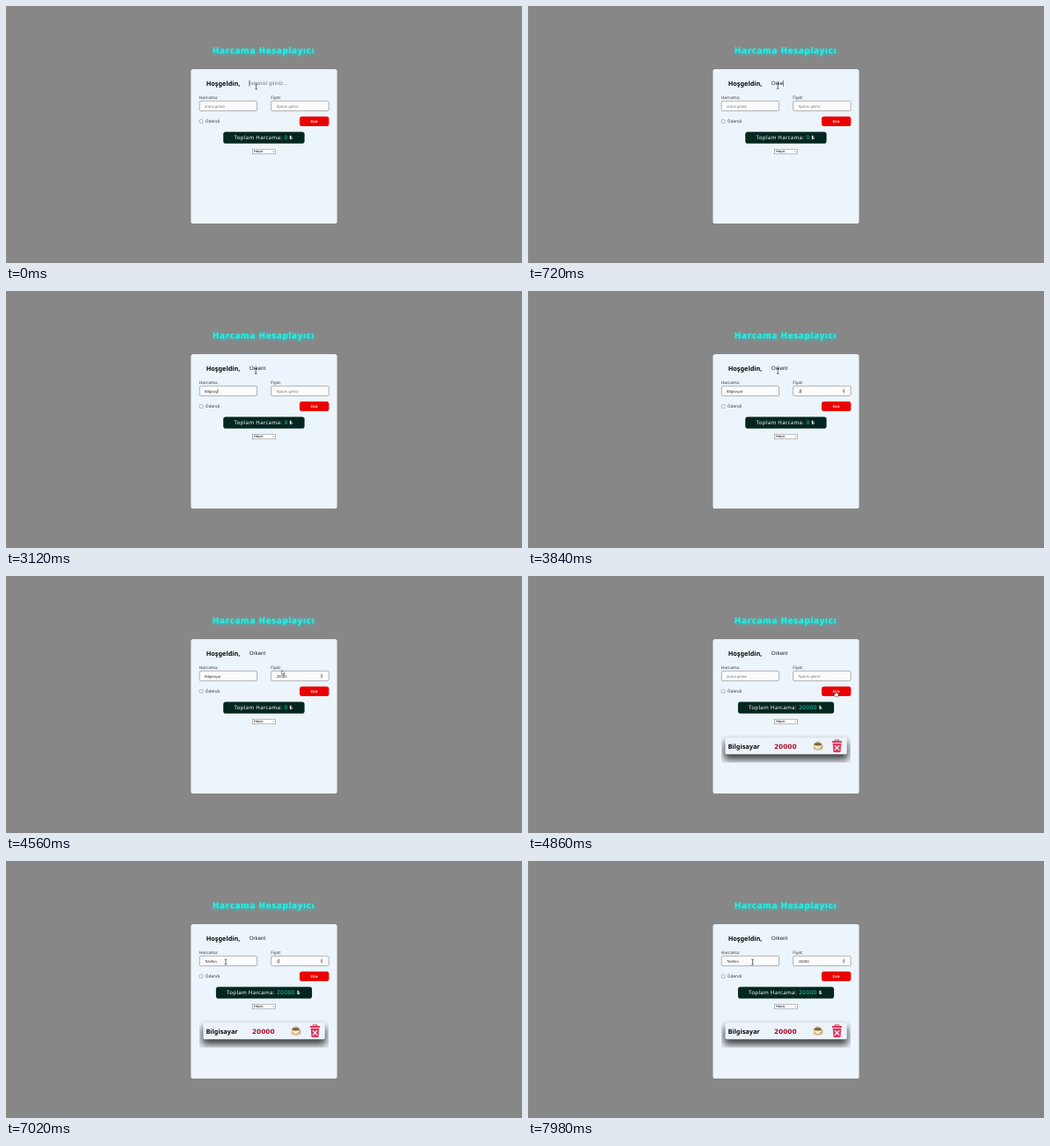
An HTML page for the animation above (8 s loop, 587x293 px).

```html
<!DOCTYPE html>
<html lang="tr">
<head>
<meta charset="utf-8">
<title>Harcama Hesaplayıcı</title>
<style>
  html, body { margin: 0; width: 100%; height: 100%; overflow: hidden; background: #878787; }
  svg { display: block; width: 587px; height: 293px; }
  text { font-family: "Noto Sans", "Open Sans", sans-serif; text-rendering: geometricPrecision; white-space: pre; }
  .title { font-size: 9.8px; font-weight: 800; letter-spacing: .74px; fill: #22f5e8; }
  .big { font-size: 7.34px; font-weight: 700; fill: #0b0b0b; }
  .label { font-size: 4.75px; fill: #333; }
  .name, .field, .small { font-family: "Liberation Sans", Arial, sans-serif; }
  .name { font-size: 6.2px; fill: #222; }
  .field { font-size: 4.28px; fill: #333; }
  .small { font-size: 4.08px; fill: #111; }
  .hint { fill: #777; }
  .total { font-size: 6.1px; letter-spacing: .3px; fill: #fff; }
  .digits { font-family: "DejaVu Sans", sans-serif; }
  .box { fill: #fbfcfd; stroke: #7d8184; stroke-width: .6; }
  .button { font: 700 4.2px "Liberation Serif", Times, serif; fill: #fff; text-anchor: middle; }
</style>
</head>
<body>
<svg viewBox="0 0 587 293">
  <defs>
    <filter id="glow" x="-20%" y="-100%" width="140%" height="300%"><feGaussianBlur stdDeviation="1.8"/></filter>
    <filter id="soft" x="-20%" y="-100%" width="140%" height="300%"><feGaussianBlur stdDeviation="4"/></filter>
    <clipPath id="list"><rect x="220" y="181" width="147" height="31.7"/></clipPath>
  </defs>

  <rect width="587" height="293" fill="#878787"/>
  <rect width=".7" height="293" fill="#9a8a80"/>

  <text class="title" x="235.4" y="55" style="fill:#00e5e5" filter="url(#glow)">Harcama Hesaplayıcı</text>
  <text class="title" x="234.8" y="54.4">Harcama Hesaplayıcı</text>

  <rect x="210.4" y="72" width="166.2" height="176" rx="2.6" fill="#edf5fc"/>
  <text class="big" x="227.7" y="91">Hoşgeldin,</text>
  <text class="label" x="219.8" y="105.8">Harcama:</text>
  <text class="label" x="301.2" y="105.8">Fiyat:</text>
  <rect class="box" x="220.2" y="108.3" width="65.4" height="11.3" rx="1.6"/>
  <rect class="box" x="301.6" y="108.3" width="65.6" height="11.3" rx="1.6"/>
  <rect x="220.2" y="129.7" width="3.7" height="3.7" rx=".7" fill="#fff" stroke="#707070" stroke-width=".5"/>
  <text class="label" x="226.8" y="133.2">Ödendi</text>
  <rect x="334" y="126" width="33.4" height="11" rx="2.8" fill="#ea0000"/>
  <text class="button" x="350.6" y="132.9">Ekle</text>

  <rect id="bar" y="143.4" height="13.3" rx="2.8" fill="#03271f"/>
  <text id="totalLabel" class="total" y="152.3">Toplam Harcama:</text>
  <text id="sum" class="total digits" y="152.3" style="fill:#2ccfae"></text>
  <text id="lira" class="total" y="152.3" font-weight="600">₺</text>

  <rect x="280.6" y="163.2" width="26" height="5.6" fill="#fff" stroke="#777" stroke-width=".5"/>
  <text class="small" x="282" y="167.4">Hepsi</text>
  <path d="M303.3 165.5l1 1 1-1" fill="none" stroke="#333" stroke-width=".5"/>

  <g id="item">
    <g clip-path="url(#list)">
      <rect x="223" y="189" width="141" height="20.5" fill="#000" opacity=".75" filter="url(#soft)"/>
    </g>
    <rect x="224.4" y="184.3" width="138.4" height="19" rx="2" fill="#edf3fa"/>
    <text class="big" x="227.4" y="197">Bilgisayar</text>
    <text class="big digits" x="280" y="197" style="fill:#ab0d2c">20000</text>
    <g>
      <ellipse cx="330" cy="196.6" rx="5.8" ry="2.1" fill="#d9c29a"/>
      <path d="M325.4 191.5h8.6q-.3 6.3-4.3 6.3t-4.3-6.3z" fill="#f3e6c8" stroke="#b58a4a" stroke-width=".6"/>
      <ellipse cx="329.7" cy="191.7" rx="4.2" ry="1.7" fill="#8b6234"/>
      <path d="M326.5 190.5l3-1.6 3.2 1.4" fill="none" stroke="#9aa58a" stroke-width="1"/>
      <path d="M333.5 193q2.6-.3 1.6 1.7-.7 1.1-2.3 1" fill="none" stroke="#b58a4a" stroke-width=".8"/>
    </g>
    <g fill="#e2395b">
      <path d="M349.3 188.3v-1.4h4.4v1.4" fill="none" stroke="#c22c4c" stroke-width=".9"/>
      <rect x="345.8" y="188" width="11.4" height="2.3" rx=".8"/>
      <path d="M346.7 191h9.6l-.7 9q-.1 1-1.1 1h-6q-1 0-1.1-1z"/>
      <path d="M349.3 193.7l4.4 4.5m0-4.5l-4.4 4.5" stroke="#fff" stroke-width="1.2" stroke-linecap="round"/>
    </g>
  </g>

  <text id="name" class="name" x="276.7" y="90.3"></text>
  <text id="goods" class="field" x="226" y="115.6"></text>
  <text id="price" class="field" x="307.7" y="115.6"></text>
  <g id="spinner">
    <rect x="357.4" y="111.3" width="3.4" height="5.3" fill="#e9e6e8"/>
    <path d="M358 113.4l1.1-1.4 1.1 1.4zM358 114.6l1.1 1.4 1.1-1.4z" fill="#775f66"/>
  </g>
  <rect id="caret" width=".5" fill="#111"/>

  <g id="beam" fill="none" stroke="#222" stroke-width=".65">
    <path d="M-1.3-3q1.3 0 1.3.7 0-.7 1.3-.7M0-2.6v5.2M-1.3 3q1.3 0 1.3-.7 0 .7 1.3.7"/>
  </g>
  <path id="arrow" d="M0 0v5l1.2-1.1.9 2 .9-.4-.9-1.9h1.6z" fill="#fff" stroke="#222" stroke-width=".5"/>
  <path id="hand" d="M-.6 3V-.6q.6-.7 1.2 0v1.7l2 .5q.7.3.5 1.2l-.5 2.6h-3l-1.8-2.5q-.1-.8.6-.5z" fill="#fff" stroke="#222" stroke-width=".45"/>
</svg>
<script>
const LOOP = 8000, TICK = 60, ADD = 4860;
const $ = id => document.getElementById(id);

const fields = {
  name:  { hint: "İsminizi giriniz...", size: 6.2 },
  goods: { hint: "ürünü giriniz", size: 4.28 },
  price: { hint: "fiyatını giriniz", size: 4.28 }
};

// Each entry: field, time of focus, typed text, time of each key.
const typing = [
  ["name", 0, "Orkent", [360, 480, 600, 660, 780, 840]],
  ["goods", 1380, "Bilgisayar", [1860, 1980, 2100, 2340, 2460, 2580, 2880, 3120, 3240, 3300]],
  ["price", 3420, "20000", [3780, 3900, 3960, 4080, 4140]],
  ["goods", 5640, "Telefon", [5820, 5940, 6060, 6360, 6420, 6480, 6720]],
  ["price", 6780, "15000", [7020, 7080, 7380, 7440, 7560]]
];

// Pointer path: time, x, y.
const path = [
  [0, 284.6, 92], [180, 284.2, 91.4], [4320, 284.2, 91.4], [4560, 313.7, 107.4],
  [4740, 350, 132.3], [5160, 350, 132.3], [5340, 250, 115],
  [7680, 250, 115], [7980, 255.6, 115.3]
];

const show = (id, on) => $(id).style.display = on ? "" : "none";
const inside = (x, y, l, t, r, b) => x >= l && x <= r && y >= t && y <= b;

function pointerAt(t) {
  const i = path.findIndex(p => p[0] > t);
  if (i < 0) return path[path.length - 1].slice(1);
  const [t0, x0, y0] = path[i - 1], [t1, x1, y1] = path[i];
  // The first small nudge is a jump.
  const k = i === 1 ? 0 : (t - t0) / (t1 - t0);
  return [x0 + (x1 - x0) * k, y0 + (y1 - y0) * k];
}

function pointerKind(x, y) {
  if (inside(x, y, 334, 126, 367, 137)) return "hand";
  const overInput = inside(x, y, 275, 82, 345, 95) ||
    inside(x, y, 220, 108, 286, 120) || inside(x, y, 301, 108, 367, 120);
  return overInput ? "beam" : "arrow";
}

function drawFields(t) {
  const values = { name: "", goods: "", price: "" };
  let focus, lastKey;
  for (const [id, start, text, keys] of typing) {
    if (t < start) break;
    const count = keys.filter(k => k <= t).length;
    values[id] = start < ADD && t >= ADD && id !== "name" ? "" : text.slice(0, count);
    focus = id;
    lastKey = count ? keys[count - 1] : start;
  }
  for (const id in fields) {
    $(id).textContent = values[id] || fields[id].hint;
    $(id).classList.toggle("hint", !values[id]);
  }
  const clicked = t >= ADD && t < 5640;
  show("spinner", focus === "price" && !clicked);

  const on = !clicked && t - lastKey < (t < 360 ? 180 : 240);
  show("caret", on);
  if (on) {
    const el = $(focus), size = fields[focus].size;
    const width = values[focus] ? el.getComputedTextLength() : 0;
    $("caret").setAttribute("x", +el.getAttribute("x") + width);
    $("caret").setAttribute("y", el.getAttribute("y") - size * .92);
    $("caret").setAttribute("height", size * 1.15);
  }
}

function drawTotal(added) {
  const put = (id, x) => $(id).setAttribute("x", x);
  $("sum").textContent = added ? "20000" : "0";
  put("bar", added ? 238.9 : 247.2);
  $("bar").setAttribute("width", added ? 109.2 : 92.4);
  put("totalLabel", added ? 251.1 : 259.6);
  put("sum", added ? 307.9 : 316.6);
  put("lira", added ? 331 : 322.6);
  show("item", added);
}

function draw(now) {
  const t = Math.floor(now % LOOP / TICK) * TICK;
  drawFields(t);
  drawTotal(t >= ADD);
  const [x, y] = pointerAt(t), kind = pointerKind(x, y);
  for (const id of ["beam", "arrow", "hand"]) show(id, id === kind);
  $(kind).setAttribute("transform", `translate(${x} ${y})`);
}

const began = performance.now();
function loop() {
  draw(performance.now() - began);
  requestAnimationFrame(loop);
}
loop();
</script>
</body>
</html>
```
